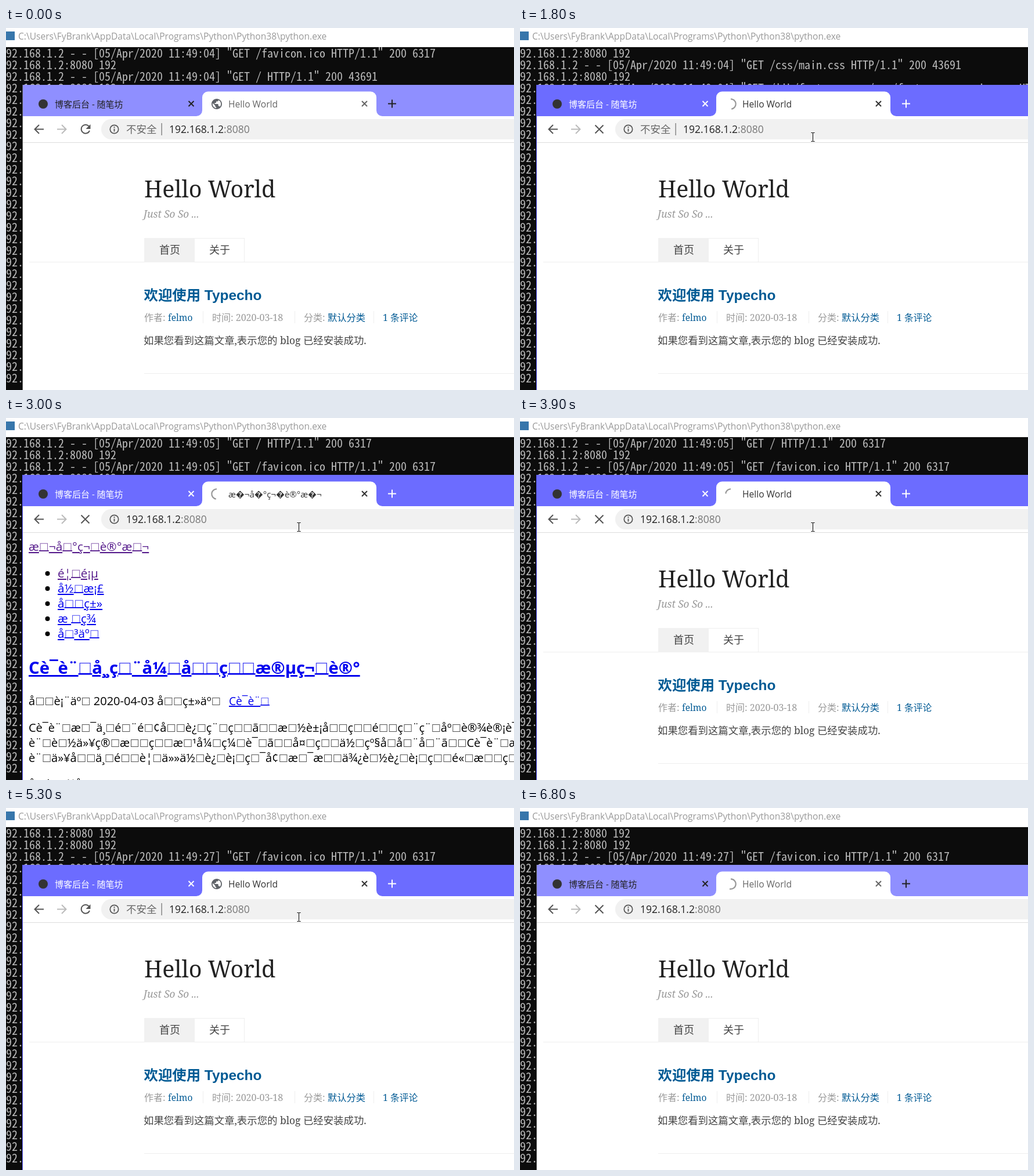
Write an HTML page that moves like this. It is 875x624 px and loops after 6900 ms.

```html
<!DOCTYPE html>
<html lang="zh-CN">
<head>
<meta charset="utf-8">
<title>Hello World</title>
<style>
html, body { margin: 0; width: 100%; height: 100%; overflow: hidden; background: #fff; }
svg { display: block; --frame: #8f8fff; --edge: #555; --tab: #222; --title: #666; }
svg.active { --frame: #6c6cff; --edge: #5a5aff; --tab: #fff; --title: #333; }
text { font-family: 'Open Sans', 'Noto Sans CJK SC', sans-serif; white-space: pre; }
.mono { font: 300 20px 'Noto Sans Mono CJK SC', 'Noto Sans Mono', monospace; fill: #bbb; }
.serif { font-family: 'Noto Serif', 'Noto Sans CJK SC', serif; }
.head { font-family: 'Liberation Sans', 'Noto Sans CJK SC', sans-serif; font-weight: bold; }
.link { text-decoration: underline; }
.box { font-family: 'DejaVu Sans', sans-serif; font-size: .86em; font-weight: normal;
  fill-opacity: .7; baseline-shift: .12em; }
.line { fill: none; stroke: #555; stroke-width: 2; }
svg:not(.loading) .if-loading, svg.loading .if-idle,
svg:not(.secure) .if-secure, svg.secure .if-plain,
svg:not(.garbled) .if-garbled, svg.garbled .if-hello { display: none; }
</style>
</head>
<body>
<svg id="stage" width="875" height="624" viewBox="0 0 875 624"></svg>
<script>
const stage = document.getElementById('stage');

const text = (x, y, size, fill, str, cls = '') =>
  `<text x="${x}" y="${y}" class="${cls}" style="font-size:${size}px;fill:${fill}">${
    str.replace(/□+/g, '<tspan class="box">$&</tspan>')}</text>`;
const rect = (x, y, w, h, fill, more = '') =>
  `<rect x="${x}" y="${y}" width="${w}" height="${h}" fill="${fill}" ${more}/>`;
const line = (d, style = '') => `<path class="line" d="${d}" style="${style}"/>`;
const group = (cls, ...parts) => `<g class="${cls}">${parts.join('')}</g>`;
const cross = (x, y, r, color) =>
  line(`M${x - r} ${y - r}l${2 * r} ${2 * r}m0 ${-2 * r}l${-2 * r} ${2 * r}`, `stroke:${color}`);
const address = x => text(x, 181, 17.5, '#222', '192.168.1.2<tspan style="fill:#777">:8080</tspan>');

// Console behind the browser
const consoleRow = i => `<text class="mono" x="-10" y="${51 + 20 * i}">192.168.1.2</text>`;
const desktop = [
  rect(0, 0, 875, 33, '#fff'),
  rect(0, 6, 15, 15, '#3776ab'),
  text(21, 20, 15.6, '#999', 'C:\\Users\\FyBrank\\AppData\\Local\\Programs\\Python\\Python38\\python.exe'),
  rect(0, 33, 875, 591, '#0c0c0c'),
  ...Array.from({ length: 29 }, (_, i) => consoleRow(i))
];

// Browser frame
const globe = 'M12 2C6.48 2 2 6.48 2 12s4.48 10 10 10 10-4.48 10-10S17.52 2 12 2zm-1 17.93c-3.95-.49-7-3.85-7-7.93 0-.62.08-1.21.21-1.79L9 15v1c0 1.1.9 2 2 2v1.93zm6.9-2.54c-.26-.81-1-1.39-1.9-1.39h-1v-3c0-.55-.45-1-1-1H8v-2h2c.55 0 1-.45 1-1V7h2c1.1 0 2-.9 2-2v-.41c2.93 1.19 5 4.06 5 7.41 0 2.08-.8 3.97-2.1 5.39z';
const browser = [
  rect(28, 98, 847, 526, 'var(--edge)'),
  rect(29, 98, 846, 54, 'var(--frame)'),
  rect(29, 152, 846, 472, '#fff'),
  '<circle cx="64" cy="131" r="8" fill="#333"/>',
  text(84, 136.5, 15, 'var(--tab)', '博客后台 - 随笔坊'),
  cross(319, 130.5, 4.5, 'var(--tab)'),
  '<path fill="#fff" d="M328 152a10 10 0 0 0 10-10V119.500a10 10 0 0 1 10-10H628a10 10 0 0 1 10 10V142a10 10 0 0 0 10 10z"/>',
  group('if-idle', `<path fill="#5f6368" transform="translate(352.2 120.2) scale(.9)" d="${globe}"/>`),
  group('if-loading', '<path id="spinner" class="line" style="stroke:#999;stroke-width:2.2"/>'),
  group('if-hello', text(383, 137, 15.6, 'var(--title)', 'Hello World')),
  group('if-garbled', text(383, 137, 15, 'var(--title)', 'æ\ufffd¬å\ufffd°ç¬\ufffdè®°æ\ufffd¬')),
  cross(617.5, 130.5, 4.5, 'var(--title)'),
  line('M658 130.5h14m-7-7v14', 'stroke:var(--tab)'),
  line('M65 174.5H50m7-7.5l-7.5 7.5 7.5 7.5'),
  line('M88 174.5h15m-7-7.5l7.5 7.5-7.5 7.5', 'stroke:#bbb'),
  group('if-idle', line('M142.5 169A7.5 7.5 0 1 0 144 177'),
    '<path fill="#555" d="M145.500 166v8h-8z"/>'),
  group('if-loading', cross(136.5, 174.5, 7, '#555')),
  rect(164, 157, 740, 35, '#f1f1f1', 'rx="17.5"'),
  '<circle class="line" cx="186.500" cy="174.500" r="7.200" style="stroke-width:1.7"/>',
  line('M186.500 173.500v5m0-8.500v2', 'stroke-width:1.8'),
  group('if-secure', text(207, 181, 17.5, '#666', '不安全'),
    rect(267.5, 164, 1.3, 21, '#777'), address(281)),
  group('if-plain', address(207)),
  rect(29, 197, 846, 1, '#dcdcdc')
];

// Styled blog page
const blue = '#005a94', grey = '#999', rule = '#eee';
const hello = group('if-hello',
  text(238, 292, 39.4, '#222', 'Hello World', 'serif'),
  `<g font-style="italic">${text(237, 327, 17.2, grey, 'Just So So ...', 'serif')}</g>`,
  rect(40, 403, 835, 1, rule),
  rect(238.5, 362.5, 172, 41, '#fff', `stroke="${rule}"`),
  rect(238, 362, 87, 42, '#f1f1f1'),
  text(264, 389, 18, '#444', '首页'),
  text(350, 389, 18, '#444', '关于'),
  text(237.5, 469, 24.4, blue, '欢迎使用 Typecho', 'head'),
  text(238, 505, 16, grey, '作者:', 'serif'),
  text(279, 505, 15.5, blue, 'felmo', 'serif'),
  text(355, 505, 16, grey, '时间: 2020-03-18', 'serif'),
  text(513, 505, 16, grey, '分类:', 'serif'),
  text(554, 505, 16.3, blue, '默认分类', 'serif'),
  text(649, 505, 15.8, blue, '1 条评论', 'serif'),
  ...[339, 497, 633].map(x => rect(x, 488, 1, 21, rule)),
  text(237, 545, 17.4, '#444', '如果您看到这篇文章,表示您的 blog 已经安装成功.', 'serif'),
  rect(238, 595, 637, 1, rule));

// Same server, other site: unstyled and in the wrong encoding
const visited = '#551a8b', fresh = '#00e';
const menu = ['é¦□é¡µ', 'å½□æ¡£', 'å□□ç±»', 'æ □ç¾', 'å□³äº□'];
const prose = [
  'Cè¯è¨□æ□¯ä¸□é□¨é□¢å□□è¿□ç¨□ç□□ã□□æ□½è±¡å□□ç□□é□□ç□¨ç¨□åº□è®¾è®¡è¯è',
  'è¨□è□½ä»¥ç®□æ□□ç□□æ□¹å¼□ç¼□è¯□ã□□å¤□ç□□ä½□çº§å□å□¨å□¨ã□□Cè¯è¨□æ□¯',
  'è¨□ä»¥å□□ä¸□é□□è¦□ä»»ä½□è¿□è¡□ç□¯å¢□æ□¯æ□□ä¾¿è□½è¿□è¡□ç□□é«□æ□□ç□□'
];
const garbled = group('if-garbled',
  text(39, 229, 20.8, visited, 'æ□¬å□°ç¬□è®°æ□¬', 'link'),
  ...menu.map((item, i) => `<circle cx="71.500" cy="${268 + 26 * i}" r="4"/>` +
    text(89, 275 + 26 * i, 20.7, i ? fresh : visited, item, 'link')),
  `<g font-weight="bold">${text(39, 441, 29.25, fresh, 'Cè¯è¨□å¸¸ç□¨å¼□å□□ç□□æ®µç¬□è®°', 'link')}</g>`,
  text(39, 495, 20, '#000', 'å□□è¡¨äº□ 2020-04-03 å□□ç±»äº□'),
  text(384, 495, 19.2, fresh, 'Cè¯è¨□', 'link'),
  ...prose.map((str, i) => text(39, 541 + 26 * i, 20, '#000', str)),
  text(39, 638, 20, '#000', 'å□´ç□¼å'));

const cursor = '<path id="cursor" fill="none" stroke="#000" d="M-3-7.500h2.500l.5.500.5-.500H3M0-7V7M-3 7.500h2.500l.5-.500.5.500H3"/>';
stage.innerHTML = [...desktop, ...browser, hello, garbled, cursor].join('');

const get = (sec, path, rest) => `192.168.1.2 - - [05/Apr/2020 11:49:${sec}] "GET ${path} HTTP/1.1" 200 ${rest}`;
const host = '192.168.1.2:8080 192';
const logs = [
  [get('04', '/favicon.ico', 6317), host, get('04', '/', 43691), host],
  [host, get('04', '/css/main.css', 43691), host, get('04', '/lib/font-awesome/css/font-awesome.min.css', 43691)],
  [get('05', '/', 6317), host, get('05', '/favicon.ico', 6317), host],
  [get('26', '/images/favicon-32x32-next.png', 43691), host, get('26', '/images/favicon-16x16-next.png', 43691), host],
  [host, host, get('27', '/favicon.ico', 6317), host]
];

// [start, state classes, log, spinner direction, spinner start]
const scenes = [
  [0, 'secure', 0],
  [100, 'active secure', 0],
  [200, 'active loading', 0, -1, 200],
  [1500, 'active loading secure', 1, 1, 1000],
  [2000, 'active loading secure garbled', 1, 1, 1000],
  [2200, 'active loading garbled', 1, -1, 2200],
  [2500, 'active loading garbled', 2, -1, 2200],
  [3100, 'active loading secure', 2, 1, 2900],
  [3200, 'active secure', 2],
  [3500, 'active loading', 2, -1, 3500],
  [4200, 'active loading secure garbled', 3, 1, 4100],
  [4700, 'active loading garbled', 3, -1, 4600],
  [5000, 'active loading secure', 4, 1, 4900],
  [5300, 'active secure', 4],
  [5900, 'active loading', 4, 1, 5900],
  [6200, 'loading', 4, 1, 5900]
];

const rows = [...stage.querySelectorAll('.mono')].slice(0, 4);
const spinner = document.getElementById('spinner');
const pointer = document.getElementById('cursor');
const clamp = v => Math.max(0, Math.min(1, v));
const ease = v => v * v * (3 - 2 * v);

function arc(dir, degrees) {
  const a = dir * degrees * Math.PI / 180;
  const x = 363 + 8.7 * Math.sin(a), y = 131 - 8.7 * Math.cos(a);
  return `M363 122.3A8.7 8.7 0 ${+(degrees > 180)} ${+(dir > 0)} ${x} ${y}`;
}

function draw(now) {
  const t = Math.floor(now % 6900 / 100) * 100;
  const [, state, log, dir, begin] = scenes.findLast(scene => scene[0] <= t);
  stage.setAttribute('class', state);
  rows.forEach((row, i) => row.textContent = logs[log][i]);
  if (dir) spinner.setAttribute('d', arc(dir, (t - begin) * .215));

  const inside = ease(clamp((t - 700) / 700)) * (1 - ease(clamp((t - 5500) / 500)));
  pointer.setAttribute('transform', `translate(${214.5 + 290 * inside} ${176 + 12 * inside})`);
  pointer.style.display = t >= 800 && t < 6000 ? '' : 'none';
}

const origin = performance.now();
(function tick() {
  draw(performance.now() - origin);
  requestAnimationFrame(tick);
})();
</script>
</body>
</html>
```
